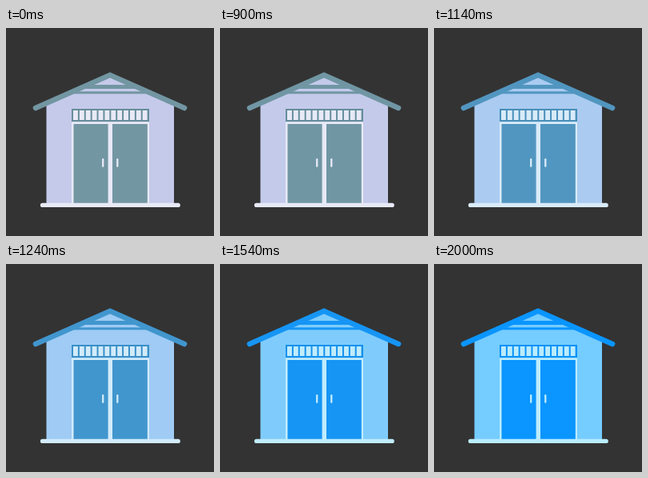
These frames come from a looping animation (260x260 px, 4040 ms). An HTML page with a canvas:

```html
<!DOCTYPE html>
<html lang="en">
<head>
<meta charset="utf-8">
<title>Shed</title>
<style>
  html, body { margin: 0; width: 100%; height: 100%; overflow: hidden; background: #333; }
  canvas { display: block; width: 100vw; height: 100vh; }
</style>
</head>
<body>
<canvas></canvas>
<script>
const SIZE = 260, LOOP = 4040, START = 880, FADE = 880;
const canvas = document.querySelector('canvas');
const ctx = canvas.getContext('2d');
const dpr = window.devicePixelRatio || 1;
canvas.width = canvas.height = Math.round(SIZE * dpr);
ctx.scale(canvas.width / SIZE, canvas.height / SIZE);

// Each part fades from its muted colour to its bright one.
const palette = {
  wall:  [[197, 202, 234], [117, 204, 255]],
  main:  [[114, 150, 162], [10, 149, 255]],
  frame: [[102, 141, 154], [8, 146, 248]],
  light: [[232, 234, 246], [186, 236, 254]]
};

// Nearly linear start, soft landing.
function ease(s) {
  const r = 1 - s;
  return 0.75 * r * r * s + 3 * r * s * s + s * s * s;
}

function mix([a, b], k) {
  return `rgb(${a.map((v, i) => Math.round(v + (b[i] - v) * k)).join(',')})`;
}

function box(x1, y1, x2, y2, color) {
  ctx.fillStyle = color;
  ctx.fillRect(x1, y1, x2 - x1, y2 - y1);
}

function trace(points) {
  ctx.beginPath();
  points.forEach(([x, y]) => ctx.lineTo(x, y));
}

function line(points, width, color) {
  trace(points);
  ctx.lineWidth = width;
  ctx.lineCap = 'round';
  ctx.lineJoin = 'miter';
  ctx.strokeStyle = color;
  ctx.stroke();
}

const ROOF = [[37, 100], [130, 58.8], [223, 100]];

function drawWall(c) {
  ctx.save();
  trace(ROOF);
  ctx.lineTo(223, 220);
  ctx.lineTo(37, 220);
  ctx.clip();
  box(50.5, 55, 210, 220, c.wall);
  box(80, 71, 180, 76, c.main);
  box(80, 79.3, 180, 82.3, c.main);
  ctx.restore();
}

function drawWindows(c) {
  box(82, 101, 179, 117, c.frame);
  const step = 94.6 / 12;
  for (let i = 0; i < 12; i++) {
    const x = 84 + i * step;
    box(x, 103, x + 5.9, 115, c.light);
  }
}

function drawDoors(c) {
  box(82, 117.5, 179, 220, c.light);
  box(84.5, 120, 127.6, 219, c.main);
  box(133, 120, 176.8, 219, c.main);
  for (const x of [121.2, 139.3]) line([[x, 164.2], [x, 172.8]], 2.3, c.light);
}

function draw(time) {
  const s = Math.min(1, Math.max(0, (time - START) / FADE));
  const k = ease(s);
  const c = {};
  for (const name in palette) c[name] = mix(palette[name], k);

  box(0, 0, SIZE, SIZE, '#333');
  drawWall(c);
  drawWindows(c);
  drawDoors(c);
  line(ROOF, 6.6, c.main);
  line([[45.5, 221.4], [215.2, 221.4]], 5.2, c.light);
}

const begin = performance.now();
function tick() {
  draw((performance.now() - begin) % LOOP);
  requestAnimationFrame(tick);
}
tick();
</script>
</body>
</html>
```
